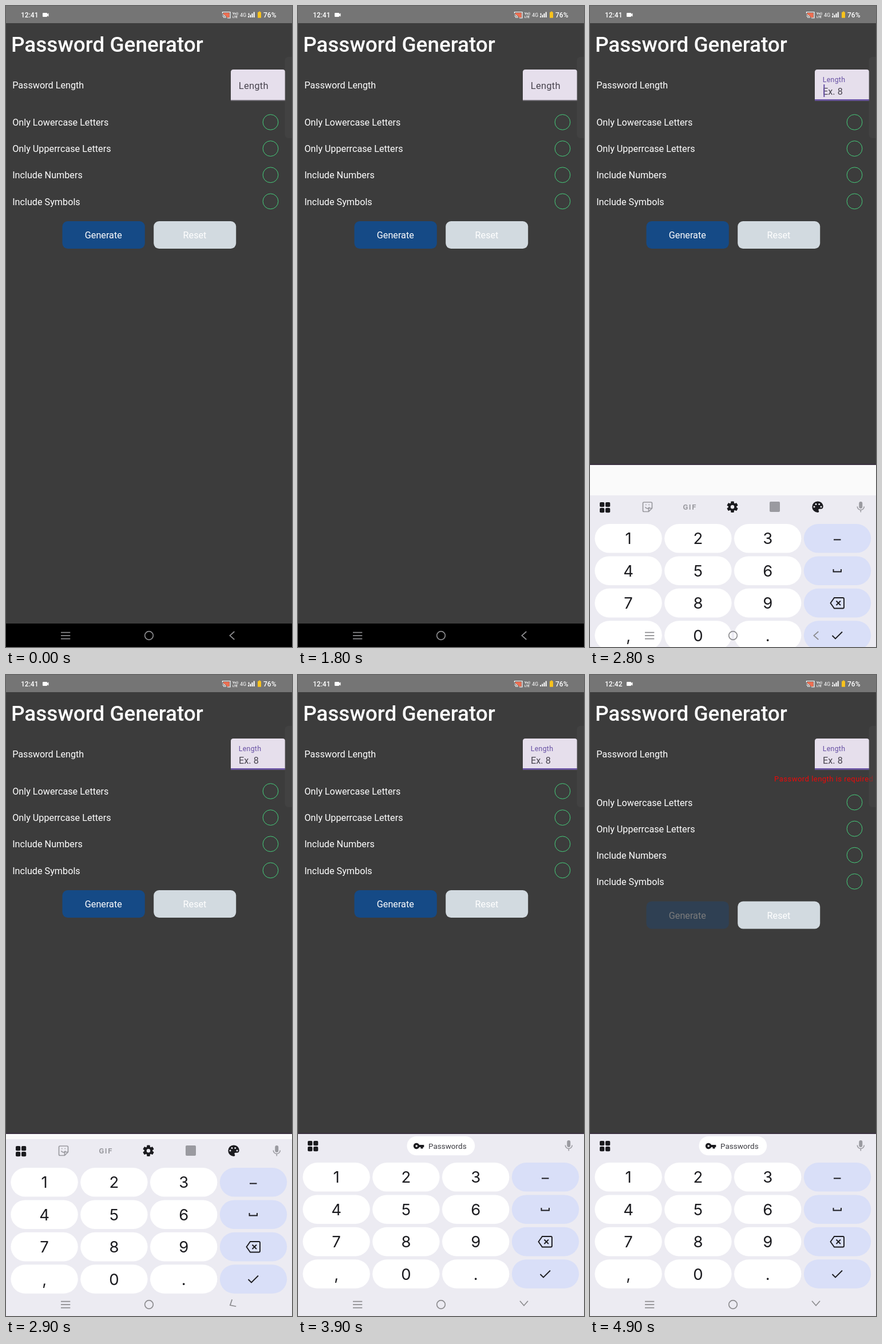
An HTML page for the animation above (5000 ms loop, 500x1120 px).

```html
<!DOCTYPE html>
<html lang="en">
<head>
<meta charset="utf-8">
<title>Password Generator</title>
<style>
  html, body { margin: 0; width: 100%; height: 100%; overflow: hidden; background: #3c3c3c; }
  svg { display: block; font-family: Roboto, sans-serif; }
  text { white-space: pre; }
  .body { font-size: 16.2px; fill: #fff; }
  .mid { text-anchor: middle; }
  .line { fill: none; }
  .status { font-size: 12px; font-weight: 500; fill: #fff; }
  .digit { font: 27.5px Inter, sans-serif; fill: #1b1b1f; text-anchor: middle; }
</style>
</head>
<body>
<svg width="500" height="1120" viewBox="0 0 500 1120">
  <rect width="500" height="1120" fill="#3c3c3c"/>

  <!-- status bar -->
  <rect width="500" height="30" fill="#757575"/>
  <text id="clock" class="status" x="26" y="19.6"></text>
  <path d="M65 12h6q1 0 1 1v1l2.5-1.5v6L72 17v1q0 1-1 1h-6q-1 0-1-1v-5q0-1 1-1z" fill="#fff"/>
  <path d="M380 12h10.500v8H386q-1-4-6-5z" fill="#ee6f52"/>
  <path class="line" d="M378.500 13v-2.500h13.500v10.500h-5M378.500 15.500a5.500 5.500 0 0 1 5.500 5.500M378.500 18a3 3 0 0 1 3 3" stroke="#fff" stroke-width="1.200"/>
  <g fill="#fff" font-weight="700" font-size="5.400">
    <text x="396" y="15">Vo))</text>
    <text x="396" y="20.500">LTE</text>
  </g>
  <text x="409" y="19" font-size="9" fill="#fff">4G</text>
  <path d="M423 17.500h2v2.500h-2zM426.300 15.500h2v4.500h-2zM429.500 13h2v7h-2zM432.700 10.500h2v9.500h-2z" fill="#fff"/>
  <path id="arrow" d="M423 14.500l1.500-2.500 1.500 2.500zm1 0h1v2h-1z" fill="#fff"/>
  <path d="M442 9.500h2.500v1.200h1q.5 0 .5.500v9q0 .6-.6.600h-4.800q-.6 0-.6-.6v-9q0-.5.500-.5h1.500z" fill="#f9c21c"/>
  <text class="status" x="450" y="19.600">76%</text>

  <!-- form -->
  <text x="8.900" y="80.300" font-size="36.900" font-weight="500" fill="#fff">Password Generator</text>
  <text class="body" x="11.200" y="144">Password Length</text>
  <path d="M393 165.300V115.600q0-4.600 4.600-4.600h86q4.600 0 4.600 4.600v49.700z" fill="#e6dfec"/>
  <rect id="underline" x="393" width="95.200"/>
  <text id="label" letter-spacing=".25">Length</text>
  <text id="hint" x="407" y="154.600" font-size="16.280" fill="#49454f">Ex. 8</text>
  <rect id="caret" x="408.300" y="137" width="2" height="22" fill="#6750a4"/>
  <text id="error" x="322.100" y="186" font-size="13.100" letter-spacing=".44" fill="#ee0808">Password length is required</text>
  <g id="options">
    <g id="rows"></g>
    <g id="generate">
      <rect x="98.500" y="376" width="144.300" height="47.900" rx="9.300" fill="#154a86"/>
      <text class="body mid" x="170.300" y="406">Generate</text>
    </g>
    <rect x="258.200" y="376" width="144" height="47.900" rx="9.300" fill="#d2dae0"/>
    <text class="body mid" x="330" y="406">Reset</text>
  </g>
  <path d="M500 89h-6q-6.500 0-6.500 7v128q0 7 6.500 7h6z" fill="#464646" opacity=".6"/>

  <!-- keyboard -->
  <g id="keyboard">
    <rect y="800" width="500" height="2" fill="#3a303f"/>
    <rect y="802" width="500" height="318" fill="#fafafa"/>
    <g id="panel">
      <rect y="802" width="500" height="330" fill="#ecebf2"/>
      <g fill="#1b1b1f">
        <rect x="17" y="814" width="8.200" height="8.200" rx="2"/>
        <rect x="27" y="814" width="8.200" height="8.200" rx="2"/>
        <rect x="17" y="824" width="8.200" height="8.200" rx="2"/>
        <rect x="27" y="824" width="8.200" height="8.200" rx="2"/>
      </g>
      <g id="tools">
        <g class="line" stroke="#9a9aa0" stroke-width="1.700">
          <path d="M94.500 814h12q2 0 2 2v8.500l-6 6h-8q-2 0-2-2v-12.500q0-2 2-2zM108 824.500h-5.500v5.500M96.500 822.500q3.500 5 7.500 0M97 818.500h1.500M102.500 818.500h1.500"/>
        </g>
        <text x="162.500" y="827" font-size="13" font-weight="700" letter-spacing="1.500" fill="#9a9aa0">GIF</text>
        <g id="gear" fill="#1b1b1f"></g>
        <rect x="314" y="813" width="18" height="18" rx="2" fill="#9a9aa0"/>
        <path d="M398 812.500a9.700 9.700 0 1 0 0 19.400c3 0 2.500-2.400 1.700-3.400-.9-1.500 0-2.800 1.500-2.800h2.500c2.400 0 4-1.700 4-4.300 0-5-4.300-8.900-9.700-8.900z" fill="#1b1b1f"/>
        <g fill="#ecebf2">
          <circle cx="392" cy="822" r="1.500"/><circle cx="395" cy="817.500" r="1.500"/>
          <circle cx="400.700" cy="817.500" r="1.500"/><circle cx="404" cy="822" r="1.500"/>
        </g>
      </g>
      <g id="chip">
        <rect x="190.500" y="806" width="118.700" height="33.300" rx="16.600" fill="#fff"/>
        <path d="M212 821h8.300v4h-1.800v2.600h-4v-2.600H212a5.300 5.300 0 1 1 0-4zM207.200 821.200a1.800 1.800 0 1 0 0 3.600 1.800 1.800 0 0 0 0-3.600z" fill="#1b1b1f" fill-rule="evenodd"/>
        <text x="228" y="828.200" font-size="13.500" fill="#3b3b41">Passwords</text>
      </g>
      <rect x="470.300" y="813" width="6" height="12" rx="3" fill="#9a9aa0"/>
      <path class="line" d="M467.300 821.500a6 6 0 0 0 12 0M473.300 827.500v4" stroke="#9a9aa0" stroke-width="1.600"/>
      <g id="keys"></g>
      <g class="line" stroke="#1b1b1f" stroke-width="1.900">
        <path d="M426 879.500h12.500M425.500 931v4.500h13.500v-4.500"/>
        <path d="M427 981h15q2 0 2 2v14.500q0 2-2 2h-15l-6.500-9.250zM430.500 986.500l7.500 7.500M438 986.500l-7.500 7.500M423.500 1047l5.500 5.500 12-12"/>
      </g>
    </g>
  </g>

  <!-- navigation bar -->
  <rect id="navBar" y="1079" width="500" height="41"/>
  <g class="line" stroke="#8c8c8f" stroke-width="1.700">
    <path d="M96 1094.700h16.300M96 1100.200h16.300M96 1105.700h16.300"/>
    <circle cx="250" cy="1100" r="7.300"/>
    <path id="back" d="M4.300-7L-3.700 0 4.300 7"/>
  </g>
</svg>
<script>
const LOOP = 5000, STEP = 100, FOCUS = 2400;
const $ = id => document.getElementById(id);
const set = (id, attrs) => { for (const k in attrs) $(id).setAttribute(k, attrs[k]); };
const show = (id, on) => set(id, { opacity: +on });
const clamp = v => Math.max(0, Math.min(1, v));
const mix = (a, b, p) => a + (b - a) * p;

$('rows').innerHTML = ['Only Lowercase Letters', 'Only Upperrcase Letters', 'Include Numbers', 'Include Symbols']
  .map((name, i) => {
    const y = 203 + 46.1 * i;
    return `<text class="body" x="11.2" y="${y + 6.2}">${name}</text>
      <circle class="line" cx="462.5" cy="${y}" r="13.4" stroke="#46d67f" stroke-width=".95"/>`;
  }).join('');

$('keys').innerHTML = [...'123 456 789 ,0. '].map((char, i) => {
  const col = i % 4, x = 8.4 + 121.8 * col, y = 852 + 56.4 * (i >> 2);
  return `<rect x="${x}" y="${y}" width="117.4" height="50.6" rx="25.3" fill="${col < 3 ? '#fff' : '#d9dff8'}"/>
    <text class="digit" x="${x + 58.7}" y="${y + 35.3}">${char}</text>`;
}).join('');

$('gear').innerHTML = [0, 60, 120].map(a =>
  `<rect x="246.2" y="812.5" width="5.6" height="19.4" rx="1.2" transform="rotate(${a} 249 822.2)"/>`).join('') +
  '<circle cx="249" cy="822.2" r="7.2"/><circle cx="249" cy="822.2" r="3.2" fill="#ecebf2"/>';

function draw(now) {
  const t = Math.floor(now % LOOP / STEP) * STEP;
  const focused = t >= FOCUS, keyboard = t >= 2800, failed = t >= 4900;

  $('clock').textContent = t < 4600 ? '12:41' : '12:42';
  show('arrow', t < 700 || t >= 1800 && t < 3000 || t >= 4800);

  // floating label
  const p = clamp((t - 2370) / 150);
  set('label', {
    x: 406.8, y: mix(145.4, 132.8, p), 'font-size': mix(16.5, 12.4, p),
    fill: focused ? '#6750a4' : '#49454f'
  });
  set('underline', focused
    ? { y: 163, height: 2.5, fill: '#6750a4' }
    : { y: 164.1, height: 1.2, fill: '#79747e' });
  show('hint', t >= 2500);
  show('caret', focused && (t - FOCUS) % 1000 < 500);

  // keyboard slides up and settles
  show('keyboard', keyboard);
  show('navBar', !keyboard);
  const slide = Math.round(53 * Math.exp(-(t - 2800) / 55));
  set('panel', { transform: `translate(0 ${keyboard ? slide : 0})` });
  const turn = clamp((t - 2800) / 300);
  set('back', { transform: `translate(395 ${1100 - 2 * turn}) rotate(${-90 * turn})` });

  const swap = clamp((t - 3250) / 100);
  set('tools', { opacity: 1 - swap });
  set('chip', { opacity: swap });

  // pressed button and validation message
  set('generate', { opacity: t < 4800 ? 1 : failed ? .32 : .65 });
  show('error', failed);
  set('options', { transform: `translate(0 ${failed ? 19.5 : 0})` });
}

function frame() {
  draw(performance.now());
  requestAnimationFrame(frame);
}
frame();
</script>
</body>
</html>
```
